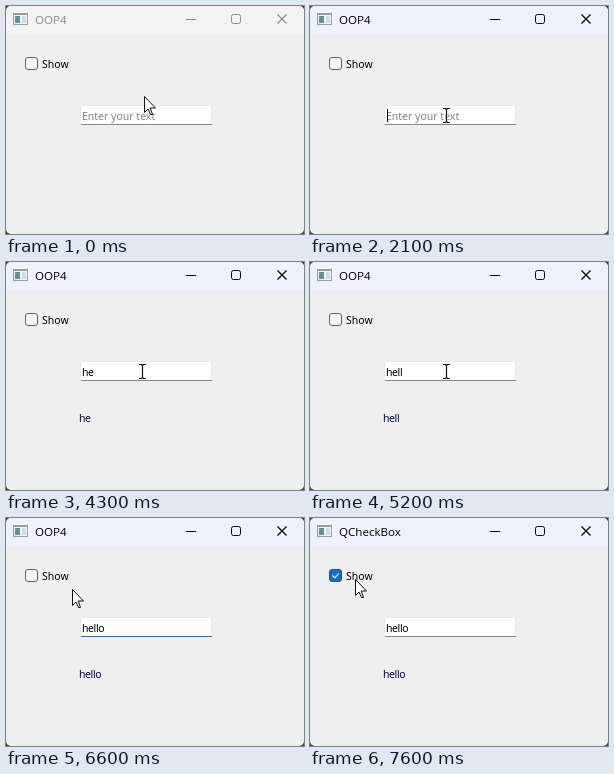
Write an HTML page with a canvas that moves like this. It is 298 px wide and 228 px high and loops after 8 s.

```html
<!DOCTYPE html>
<html lang="en">
<head>
<meta charset="utf-8">
<title>Checkbox demo</title>
<style>
  html, body { margin: 0; width: 100%; height: 100%; overflow: hidden; background: #444; }
  canvas { display: block; width: 298px; height: 228px; }
</style>
</head>
<body>
<canvas></canvas>
<script>
const W = 298, H = 228, LOOP = 8000;
const UI_FONT = '500 10.5px "Noto Sans", sans-serif';
const TITLE_FONT = '11.6px "Open Sans", sans-serif';
const TIGHT = '-0.4px';

const canvas = document.querySelector('canvas');
const ctx = canvas.getContext('2d');
const scale = window.devicePixelRatio || 1;
canvas.width = W * scale;
canvas.height = H * scale;

// Each track holds [start time, value...] and keeps a value until the next one.
const pointerTrack = [
  [0, 138, 90, 'arrow'], [100, 136, 93, 'arrow'],
  [400, 137, 99, 'beam'], [500, 137, 101, 'beam'], [600, 137, 102, 'beam'], [700, 136, 109, 'beam'],
  [6400, 127, 105, 'beam'], [6500, 92, 87, 'arrow'], [6600, 66, 71, 'arrow'],
  [6700, 50, 63, 'arrow'], [6800, 45, 61, 'arrow']
];
const typedTrack = [[0, ''], [2500, 'h'], [3700, 'he'], [4400, 'hel'], [4600, 'hell'], [5500, 'hello']];
const caretTrack = [
  [0, false], [1000, true], [1600, false], [2100, true], [3200, false], [3700, true],
  [4300, false], [4400, true], [5200, false], [5500, true], [6100, false], [6700, true], [7200, false]
];
const at = (track, t) => track.filter(key => key[0] <= t).pop().slice(1);

function rect(x, y, w, h, color) {
  ctx.fillStyle = color;
  ctx.fillRect(x, y, w, h);
}

function roundBox(x, y, w, h, r, fill, stroke) {
  ctx.beginPath();
  ctx.roundRect(x, y, w, h, r);
  if (fill) { ctx.fillStyle = fill; ctx.fill(); }
  if (stroke) { ctx.strokeStyle = stroke; ctx.stroke(); }
}

function line(path, color, width = 1) {
  ctx.strokeStyle = color;
  ctx.lineWidth = width;
  ctx.stroke(new Path2D(path));
  ctx.lineWidth = 1;
}

// Draws the text and returns its width.
function text(str, x, y, color, font = UI_FONT, spacing = '0px') {
  ctx.font = font;
  ctx.letterSpacing = spacing;
  ctx.fillStyle = color;
  ctx.fillText(str, x, y);
  return ctx.measureText(str).width;
}

function drawTitleBar(title, active) {
  const ink = active ? '#000' : '#8c8c8c';
  rect(0, 0, W, 28, active ? '#eef3fb' : '#f3f3f3');
  rect(7, 7, 15, 12, '#989ea0');
  rect(8, 9, 13, 9, '#f4f7f7');
  rect(9, 10, 5, 7, '#5b9698');
  rect(16, 10, 4, 7, '#d3dbdc');
  text(title, 29, 17.8, ink, TITLE_FONT);
  line('M180 13.5H190', ink);
  roundBox(225.5, 8.5, 9, 9, 2, null, ink);
  line('M271.5 8.5L280.5 17.5M280.5 8.5L271.5 17.5', ink, 1.2);
}

function drawCheckBox(checked) {
  roundBox(19.5, 51.5, 12, 12, 2.5, checked ? '#196ebf' : '#f5f5f5', checked ? '#155a9c' : '#626262');
  if (checked) line('M22.5 57.5L24.8 59.8L28.8 55.5', '#fff', 1.1);
  text('Show', 36, 62, '#000');
}

function drawField(value, focusLine, caret) {
  roundBox(74.5, 99.5, 131, 19, 2, '#fff', '#e9e9e9');
  rect(75, 118, 131, 1, focusLine ? '#2f6dac' : '#868686');
  if (!value) text('Enter your text', 76, 114, '#80809a');
  const width = text(value, 76, 114, '#000', UI_FONT, TIGHT);
  if (caret) rect(Math.round(76.5 + width), 103, 1, 13, '#000');
}

function drawPointer(x, y, kind) {
  ctx.save();
  ctx.translate(x + 0.5, y + 0.5);
  if (kind === 'arrow') {
    const arrow = new Path2D('M0 0V16L3.5 12.5L6 18H8L5.7 11.5H11Z');
    ctx.fillStyle = '#fff';
    ctx.fill(arrow);
    ctx.strokeStyle = '#111';
    ctx.stroke(arrow);
  } else {
    const beam = 'M-3.5 -7H-1L0 -6L1 -7H3.5M0 -6V6M-3.5 7H-1L0 6L1 7H3.5';
    line(beam, 'rgba(255,255,255,.7)', 2.5);
    line(beam, '#111', 1.2);
  }
  ctx.restore();
}

function draw(t) {
  const checked = t >= 7300;
  const [typed] = at(typedTrack, t);
  ctx.setTransform(scale, 0, 0, scale, 0, 0);
  rect(0, 0, W, H, '#444');
  ctx.save();
  ctx.beginPath();
  ctx.roundRect(0, 0, W, H, 5);
  ctx.clip();
  rect(0, 0, W, H, '#efefef');
  drawTitleBar(t >= 7400 ? 'QCheckBox' : 'OOP4', t >= 900);
  drawCheckBox(checked);
  drawField(typed, t >= 6500 && !checked, at(caretTrack, t)[0]);
  text(typed, 73, 160, '#000058', UI_FONT, TIGHT);
  drawPointer(...at(pointerTrack, t));
  ctx.restore();
}

const start = performance.now();
function frame() {
  draw((performance.now() - start) % LOOP);
  requestAnimationFrame(frame);
}
frame();
</script>
</body>
</html>
```
